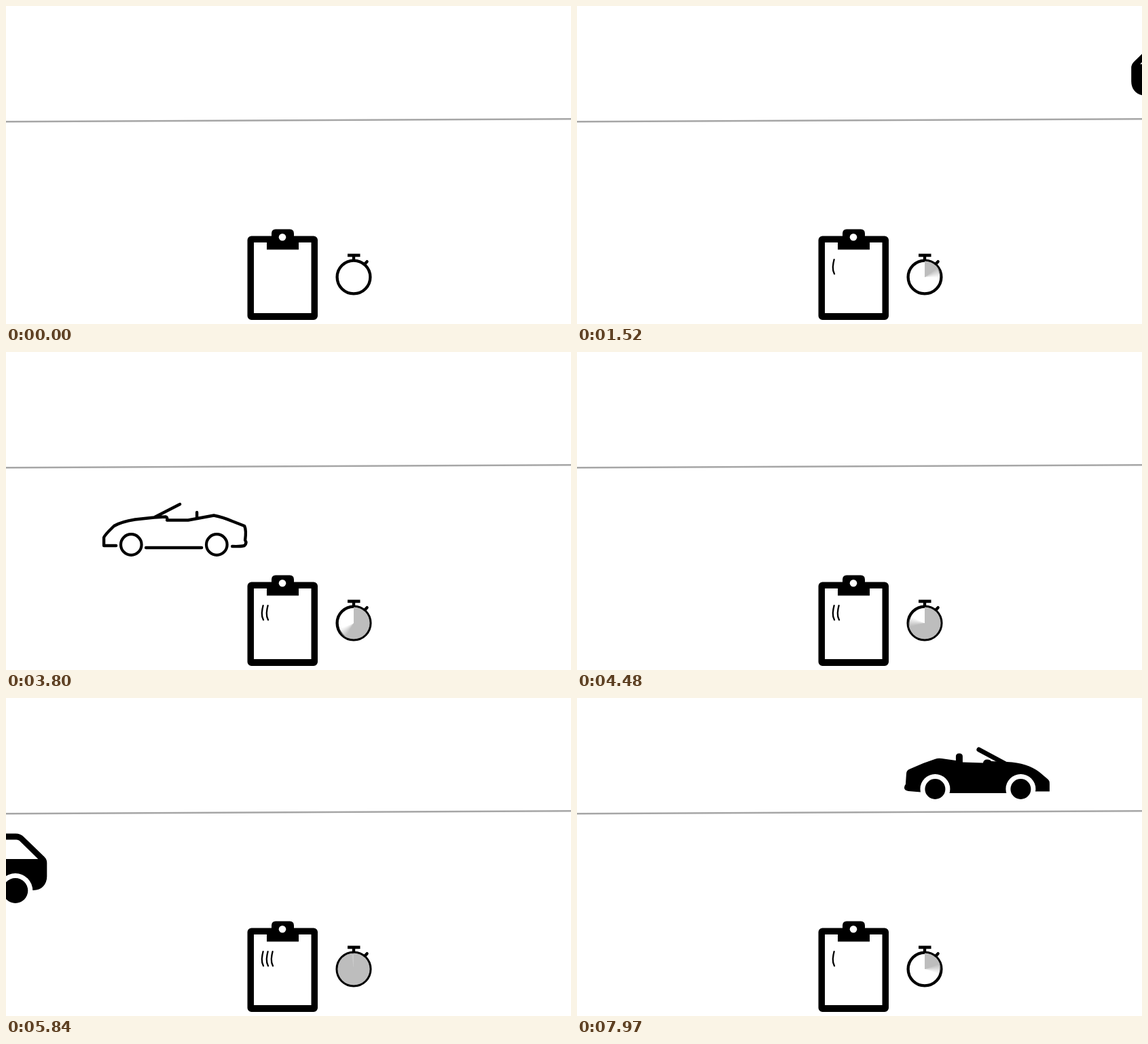
These frames come from a looping animation (832x468 px, 8 s). An HTML page with a canvas:

```html
<!DOCTYPE html>
<html>
<head>
<meta charset="utf-8">
<title>Traffic count</title>
<style>
html, body { margin: 0; width: 100%; height: 100%; overflow: hidden; background: #fff; }
canvas { display: block; }
</style>
</head>
<body>
<canvas id="stage" width="832" height="468"></canvas>
<script>
const ctx = document.getElementById('stage').getContext('2d');
const LOOP = 8000, RESET = 6370, STEP = 40;
const PASS = 1600, SWEEP = 5840, SOFT = 40;

// Car shapes, drawn from their top left corner
const HATCH = new Path2D('M0 43Q0 38 4 34L34 5Q39 0 46 0H115Q122 0 127 5L160 37H180' +
  'C195 37 205 48 205 62V75Q205 83 197 83.5H20C8 83.5 0 75 0 63Z');
const WINDOWS = new Path2D('M13 37.5L40.5 10.5Q42 9 45 9H72V37.5Z' +
  'M81.5 9H114Q117 9 119 11L145.5 37.5H81.5Z');
const ROADSTER = new Path2D('M3 40Q3 35 7 33L28 24L45 18Q50 16 55 17L76 20V14Q76 9.5 81 9.5T86 14V22.5' +
  'L116 23.5Q117 18.5 122 18.5T128 21L151 22C172 23 187 28 199 37L212 48Q214 50 214 54V65.5H195' +
  'L149 68H67L24 66.5L6 65Q0 64 0 60Q0 57 2 55Z');
const SCREEN = new Path2D('M110 4L151 26');
const OUTLINE = new Path2D('M21 63H3V51C5 46 14 38 18 34Q28 28 49 24.5L77 21.5L94 20.5Q97 21 96 25.5H127L165 18.5' +
  'Q178 21 192 27L210 34Q213 40 211 55Q214 59 210 63Q204 64.5 192 64' +
  'M65 66H147M77 21.5L115 2M140 14V23');

const clipFrame = new Path2D();
clipFrame.roundRect(355.5, 338.5, 103.5, 123.5, 6);
clipFrame.rect(365, 348, 84.5, 104);
const clipTop = new Path2D('M384 347H391V335Q391 328.5 397 328.5H418Q424 328.5 424 335V347H431V358.5H384Z');
const tally = new Path2D('M378.6 373.2Q377.2 378 376.8 384Q376.6 390 379 394.3');

function disc(x, y, r, color) {
  ctx.fillStyle = color;
  ctx.beginPath();
  ctx.arc(x, y, r, 0, Math.PI * 2);
  ctx.fill();
}

function ring(x, y, r, width) {
  ctx.lineWidth = width;
  ctx.beginPath();
  ctx.arc(x, y, r, 0, Math.PI * 2);
  ctx.stroke();
}

function wheel(x, y, r, gap) {
  disc(x, y, r + gap, '#fff');
  disc(x, y, r, '#000');
}

function hatch() {
  ctx.fill(HATCH);
  ctx.fillStyle = '#fff';
  ctx.fill(WINDOWS);
  for (const x of [46.5, 158.5]) wheel(x, 84, 18.5, 7);
}

function roadster() {
  ctx.fill(ROADSTER);
  ctx.lineWidth = 7;
  ctx.stroke(SCREEN);
  for (const x of [45.5, 171.5]) wheel(x, 62, 15, 7);
}

function outline() {
  ctx.lineWidth = 4.4;
  ctx.stroke(OUTLINE);
  for (const x of [43.2, 169.2]) ring(x, 61.5, 15.3, 4.2);
}

// mid: left edge when centred, reach: distance from there to either end
const CARS = [
  { start: 160, draw: hatch, y: 48, mid: 311, reach: 567, dir: 1 },
  { start: 2839, draw: outline, y: 222, mid: 309, reach: 540, dir: -1 },
  { start: 4560, draw: hatch, y: 199.5, mid: 314, reach: 567, dir: -1, flip: 205 },
  { start: 7004, draw: roadster, y: 72, mid: 309, reach: 540, dir: 1 }
];

function drawCar(car, t) {
  const p = (t - car.start) / PASS;
  if (p < 0 || p > 1) return;
  const x = car.mid - car.dir * car.reach * Math.cos(Math.PI * p);
  ctx.save();
  ctx.translate(x, car.y);
  if (car.flip) {
    ctx.translate(car.flip, 0);
    ctx.scale(-1, 1);
  }
  ctx.fillStyle = ctx.strokeStyle = '#000';
  car.draw();
  ctx.restore();
}

function drawRoad() {
  ctx.strokeStyle = '#a6a6a6';
  ctx.lineWidth = 2.5;
  ctx.beginPath();
  ctx.moveTo(-2, 170.2);
  ctx.lineTo(834, 166.2);
  ctx.stroke();
}

function drawClipboard(t) {
  ctx.fillStyle = ctx.strokeStyle = '#000';
  ctx.fill(clipFrame, 'evenodd');
  ctx.fill(clipTop);
  disc(407, 340.3, 5.3, '#fff');

  // One mark for each car that has passed since the count began
  const counted = CARS.filter(c => (c.start >= RESET) === (t >= RESET));
  counted.forEach((car, i) => {
    const k = Math.min(1, (t - car.start - PASS / 2 + 20) / 140);
    if (k <= 0) return;
    ctx.save();
    ctx.translate(i * 7, 0);
    ctx.beginPath();
    ctx.rect(370, 371, 16, 26 * k);
    ctx.clip();
    ctx.lineWidth = 2.3;
    ctx.stroke(tally);
    ctx.restore();
  });
}

function drawWatch(t) {
  const x = 512, y = 399;
  ctx.fillStyle = ctx.strokeStyle = '#000';
  ctx.fillRect(503, 364.6, 18.5, 4.6);
  ctx.fillRect(509.8, 368, 4.4, 7);
  ctx.lineWidth = 4.4;
  ctx.beginPath();
  ctx.moveTo(528, 380);
  ctx.lineTo(531.6, 376.2);
  ctx.stroke();
  ring(x, y, 24.4, 4.3);

  const begin = t < RESET ? 160 : RESET;
  const p = Math.max(0, Math.min(1, (t - begin) / SWEEP));
  if (p === 0) return;
  const front = p * (360 + SOFT), tail = front - SOFT;
  const gray = a => `rgba(189,189,189,${a})`;
  const shade = deg => Math.max(0, Math.min(1, (front - deg) / SOFT));
  const g = ctx.createConicGradient(-Math.PI / 2, x, y);
  for (const deg of [0, tail, front, 360]) {
    if (deg >= 0 && deg <= 360) g.addColorStop(deg / 360, gray(shade(deg)));
  }
  disc(x, y, 23.6, g);
}

function draw(t) {
  ctx.fillStyle = '#fff';
  ctx.fillRect(0, 0, 832, 468);
  ctx.lineCap = ctx.lineJoin = 'round';
  drawRoad();
  for (const car of CARS) drawCar(car, t);
  drawClipboard(t);
  drawWatch(t);
}

// The picture advances 25 times a second and rests before each count
function snap(t) {
  if (t < 160) return 0;
  const base = t < RESET ? 0 : RESET;
  const s = base + Math.floor((t - base) / STEP) * STEP;
  return t < RESET ? Math.min(s, 6000) : s;
}

function tick() {
  draw(snap(performance.now() % LOOP));
  requestAnimationFrame(tick);
}
tick();
</script>
</body>
</html>
```
